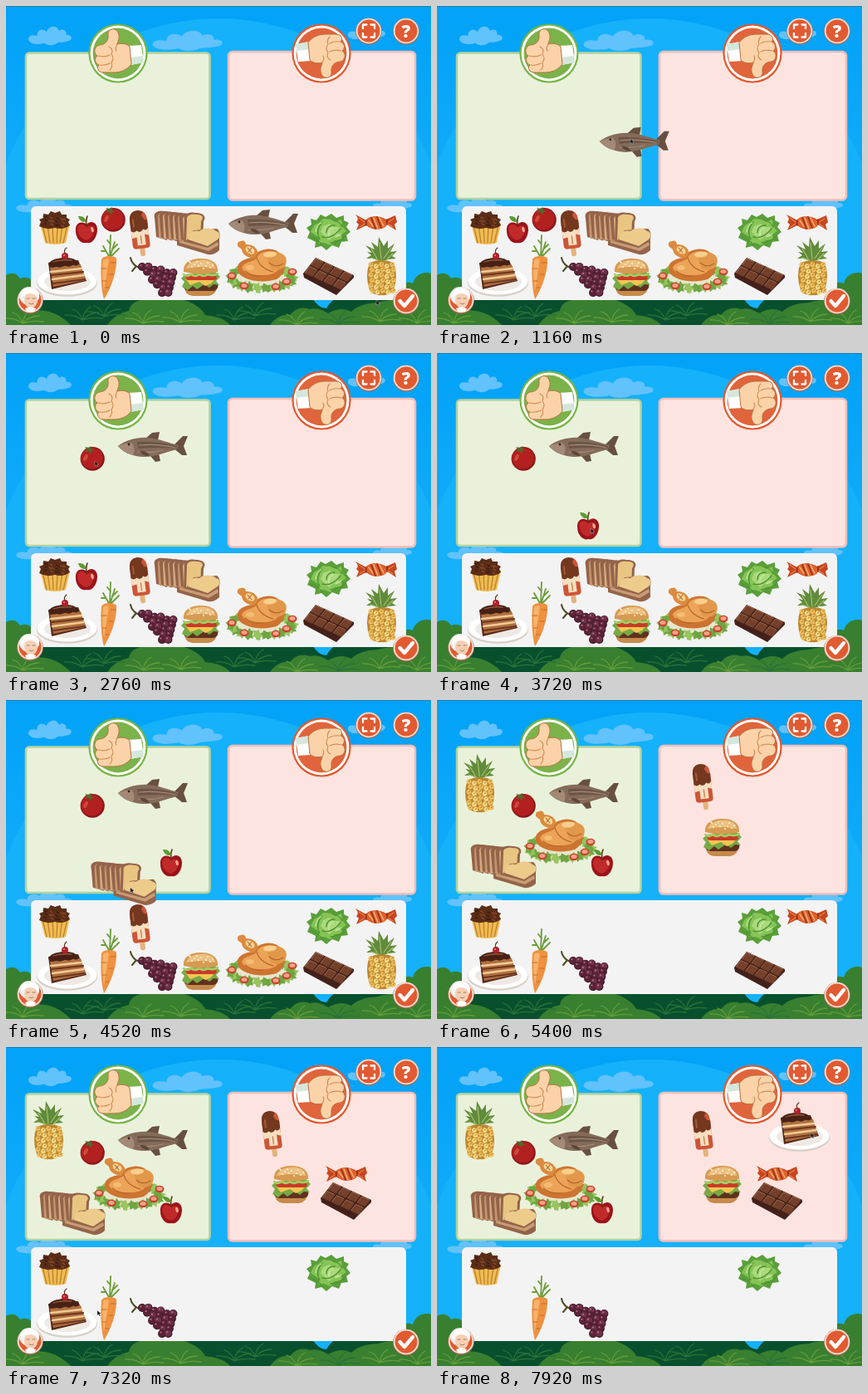
Animation, 512 px wide and 384 px high, one loop 8000 ms. Source, as an HTML page:

```html
<!DOCTYPE html>
<html lang="en">
<head>
<meta charset="utf-8">
<title>Food sorting game</title>
<style>
html, body { margin: 0; height: 100%; overflow: hidden; background: #03a1f5; }
svg { display: block; width: 100vw; height: 100vh; }
</style>
</head>
<body>
<svg id="stage" viewBox="0 0 512 384"></svg>
<script>
const LOOP = 8000, CUT = 5200, CURSOR_BACK = 5480;
const range = (n, make) => Array.from({ length: n }, (_, i) => make(i)).join('');
const path = (fill, d, extra = '') => `<path fill="${fill}" d="${d}" ${extra}/>`;
const line = (color, width, d) =>
  path('none', d, `stroke="${color}" stroke-width="${width}" stroke-linecap="round" stroke-linejoin="round"`);
const oval = (fill, x, y, rx, ry = rx, turn = 0) =>
  `<ellipse fill="${fill}" cx="${x}" cy="${y}" rx="${rx}" ry="${ry}" transform="rotate(${turn} ${x} ${y})"/>`;
const box = (fill, x, y, w, h, r, extra = '') =>
  `<rect fill="${fill}" x="${x}" y="${y}" width="${w}" height="${h}" rx="${r}" ${extra}/>`;
const group = (inner, transform = '') => `<g transform="${transform}">${inner}</g>`;

const cloud = (x, y, w, h) => group(
  path('#62c2fb', 'M1 14C1 9 7 9 12 10C12 3 20 2 24 6C27-1 38-1 40 5C45 2 50 5 49 9C57 8 58 14 52 15C45 17 42 16 38 17C31 21 24 19 21 17C14 19 4 19 1 14Z'),
  `translate(${x} ${y}) scale(${w / 56} ${h / 20})`);

const fern = (color, x, y) => group(
  line(color, 1.3, 'M0 0Q2-12 10-16M0 0Q-3-10-12-13M0 0Q8-9 20-9M0 0Q-10-7-21-6M0 0Q10-4 25-2'),
  `translate(${x} ${y})`);

const hand =
  path('#fff', 'M147 48L163 47 166 68 150 71Z') + path('#d5e7dc', 'M149 62L165 60 166 68 150 71Z') +
  path('#fcd3a8', 'M112 47C119 47 124 42 123 35C122 27 132 25 135 32C138 39 134 43 134 46C141 44 146 46 149 49L151 70C146 77 138 80 130 80H118C110 80 109 74 112 71C107 69 106 63 110 60C105 57 106 49 112 47Z',
    'stroke="#b87142" stroke-width="1"') +
  line('#d08e5b', 1.2, 'M111 60q8 2 14-1M113 71q7 1 12-2M124 49q6 3 3 9q4 5 0 10q2 5-2 9M134 46q-3 5-1 8');

const badge = (x, color, inner, turn) =>
  oval(color, x, 57, 35.6) + oval('#fff', x, 57, 33.4) + oval(inner, x, 57, 30.4) +
  group(hand, `rotate(${turn} ${x} 57) translate(${x - 135} 0)`);

const button = (x, y, icon) =>
  oval('#a9654c', x, y + .6, 15.8) + oval('#f3dccf', x, y, 15.3) + oval('#e15a31', x, y, 13.4) + icon;

const scenery =
  `<defs><linearGradient id="sky" x2="0" y2="1"><stop stop-color="#01a2f8"/><stop offset="1" stop-color="#20b2fb"/></linearGradient></defs>` +
  box('url(#sky)', 0, 0, 512, 384, 0) + oval('#15b1fb', 256, 290, 275) + box('#247fa8', 0, 0, 512, 1, 0) +
  cloud(26, 24, 53, 24) + cloud(175, 29, 86, 26) + cloud(411, 20, 46, 22) +
  cloud(11, 230, 69, 20) + cloud(441, 229, 48, 18) +
  path('#397f30', 'M0 324C8 319 14 323 17 328C27 324 34 331 35 340V384H0ZM476 384V341C476 333 484 331 490 334C493 323 504 319 512 322V384Z') +
  path('#08502d', 'M40 384V350H368Q376 364 386 364Q394 350 406 350H480V384Z') +
  path('#397f30', 'M0 384V358Q20 360 34 367Q58 364 78 384ZM122 384Q132 370 148 367Q150 354 170 353H212Q234 360 240 372Q262 374 270 384ZM318 384Q328 370 342 372Q352 360 366 365Q376 362 388 370Q404 361 416 368Q426 358 448 357Q470 350 512 357V384Z') +
  [[20, 382], [165, 382], [210, 381], [350, 384], [450, 380], [495, 382]].map(p => fern('#629c39', ...p)).join('') +
  [[92, 378], [118, 374], [275, 378], [300, 373], [400, 383]].map(p => fern('#287139', ...p)).join('') +
  box('#eaf1db', 24, 56.5, 221.5, 175.5, 4, 'stroke="#b4d39f" stroke-width="2.6"') +
  box('#fee4e0', 268, 55, 225, 178.5, 5, 'stroke="#f2bdb9" stroke-width="2.6"') +
  box('#f3f3f3', 30, 241, 452, 113, 6) +
  badge(135, '#75b543', '#7cb24a', 0) + badge(380, '#e2582e', '#e0643c', 180) +
  button(437, 30, line('#fff', 2.3, 'M430 27v-4.5h4.5M439.5 22.5h4.5v4.5M444 33v4.5h-4.5M434.5 37.5h-4.5v-4.5')) +
  button(482, 30, '<text x="482" y="37.5" text-anchor="middle" fill="#fff" font-size="21" font-weight="800" font-family="\'Open Sans\', sans-serif">?</text>') +
  button(482, 355, line('#fff', 4.4, 'M474.5 355l5.5 6 10-12')) +
  button(29, 354,
    oval('#f2f0ee', 28, 349, 12, 11) + oval('#f7cfb2', 30, 354, 8, 10) +
    path('#fff', 'M18 352C17 342 25 337 33 340C39 342 41 347 39 353Q36 346 29 346Q22 346 18 352ZM23 364L29 362 36 364 34 368H25Z') +
    line('#8f776a', .9, 'M25 352h3m4 0h3M28 358q3 2 5 0'));

const cupcake =
  path('#f0bc52', 'M41 262L77 262 72 285Q59 289 47 285Z') +
  range(6, i => line('#bd8230', 1.3, `M${44 + i * 6} 264L${49 + i * 4} 285`)) +
  path('#5b2d17', 'M40 265L42 260 40 257 45 255 45 250 51 251 54 247 59 249 65 247 67 251 73 251 73 255 77 257 75 260 77 264Q69 270 59 267Q48 270 40 265Z') +
  range(16, i => line(i % 2 ? '#8a4d2a' : '#3c1c10', 1.3, `M${45 + i * 7 % 27} ${253 + i * 5 % 12}l2.5 1.6`));

const carrot =
  line('#6c9c39', 1.8, 'M125 303L117 289M125 303L126 276M125 303L131 284M125 303L136 292M120 295l-5 0M126 287l-4-5M128 293l6-6') +
  path('#ee9140', 'M115 305C117 300 131 300 133 304C134 322 124 344 118 353C114 340 114 318 115 305Z') +
  path('#f7b36c', 'M117 306Q120 303 124 305Q121 324 118 343Q115 323 117 306Z') +
  line('#c66a28', 1, 'M126 309h6M115 316h6M124 323h5M116 331h5M120 339h4');

// Rows of berries shrink towards the tip of the bunch.
const grapes =
  line('#4c4a24', 2, 'M150 303C152 312 160 317 168 315M157 313l-5 6') +
  range(5, row => range(6 - row, col => {
    const x = 164 + row * 6 + col * 7.5, y = 314 + row * 7.8 + col * 1.8 - (row + col) % 2 * 2;
    return oval('#3c1828', x, y, 4.9) + oval(col % 2 ? '#70304a' : '#5c2238', x - .4, y - .4, 4.1) + oval('#ad7285', x - 1.5, y - 1.7, 1.1);
  }));

const cabbage =
  path('#5a9f3a', 'M363 279L366 272 362 267 368 263 367 256 374 258 379 251 385 254 392 250 398 255 407 252 407 258 413 261 410 266 415 272 410 276 412 283 404 284 401 291 393 288 386 294 380 289 372 291 373 284Z') +
  path('#86c455', 'M367 272L371 264 378 260 382 256 391 257 397 260 404 257 405 265 410 271 404 275 405 281 396 282 391 288 383 285 377 286 377 279Z') +
  path('#abd97b', 'M379 272L382 265 390 262 395 266 402 266 400 273 403 277 394 278 389 282 385 278Z') +
  line('#4d9335', 1.3, 'M378 281Q372 270 381 260M381 278Q393 281 403 268M386 273Q386 264 396 264M367 278Q378 282 381 288M391 285Q402 284 409 277M393 257Q403 260 405 266') +
  line('#d8efb6', 1, 'M389 277Q388 269 394 267M373 272Q374 263 380 261M397 278l7-4');

const fish =
  path('#67503f', 'M301 253L309 246 318 245 316 255ZM335 261L346 250 352 250 347 262 351 273 345 273 335 265ZM306 273L313 281 319 280 317 271Z') +
  path('#846b5a', 'M268 262C276 255 292 251 304 252C318 253 331 259 341 261L339 266C326 269 312 276 297 275C284 274 273 269 268 262Z') +
  path('#a48a76', 'M268 262Q274 259 284 258Q290 264 286 273Q274 269 268 262Z') +
  path('#6c5546', 'M291 257Q316 256 339 262L338 265Q315 263 292 265Z') +
  line('#a48a76', 1.2, 'M293 261Q316 259 337 264M292 269Q308 271 322 267') +
  path('#5d4638', 'M294 268Q303 267 306 274Q298 274 294 268Z') + oval('#2f2521', 281, 260, 1.4);

const tomato =
  oval('#8a171a', 129.2, 257.4, 14.6, 14.3) + oval('#b2201f', 128.5, 256.6, 13.3, 12.8) +
  oval('#cd4a3b', 121, 256, 2.2, 4.5, 25) +
  path('#52692a', 'M125 248l-5 1 3-3-3-3 5 1 3-2 0 4 4 2-4 0-1 4z');

const apple =
  path('#9c131a', 'M97 263C103 257 110 261 110 269C110 278 104 287 97 285C90 287 84 279 84 271C83 261 91 258 97 263Z') +
  path('#c02a2a', 'M86 270C86 261 93 262 97 266Q104 262 107 268Q104 280 97 282Q88 280 86 270Z') +
  oval('#f0aa8e', 104, 269, 1.6, 3.2, -15) +
  line('#5c3318', 1.6, 'M97 265Q96 258 98 253') + path('#5a9a32', 'M97 260Q89 261 87 253Q95 252 97 260Z');

const iceCream = group(
  box('#e3b37c', 159, 286, 6, 15.5, 3) +
  path('#cc5537', 'M151 258Q151 246 161 246Q172 246 172 258V288Q172 292 167 292H156Q151 292 151 288Z') +
  path('#f6dfc0', 'M151 268H172V277L167 275V288H157V278L151 279Z') +
  path('#74381f', 'M151 258Q151 246 161 246Q166 246 168 249Q164 252 167 255Q168 259 172 258V268Q169 272 166 269Q162 274 158 270Q154 273 151 270Z') +
  line('#a45f3a', 1.8, 'M155 256v9') + line('#c98253', 1.4, 'M162 277v9'),
  'rotate(-7 162 274)');

const bread =
  range(6, i => group(
    path('#946349', 'M0 8C-2 1 5-1 11 0C18 0 21 4 17 9L15 35L2 31Z') +
    path(i % 2 ? '#d3aa80' : '#c4966f', 'M4 8C3 3 8 2 11 2C18 2 19 6 14 10L13 34 5 32Z'),
    `translate(${179 + i * 6} ${247 + i * .6})`)) +
  path('#94644a', 'M215 257C213 250 222 247 229 249C237 249 242 253 238 259L237 284 214 286Z') +
  path('#e9c582', 'M218 257C217 252 223 250 229 251C236 251 239 254 235 259L234 281 217 283Z') +
  path('#94644a', 'M206 281L216 284 226 270 254 268Q259 272 257 280V294Q251 300 243 299L206 288Z') +
  path('#c89c74', 'M209 282L243 291 255 284 256 288 244 295 209 285Z') +
  path('#edcb8b', 'M219 281C221 272 226 269 233 271C240 266 249 267 253 271C259 272 258 279 255 281L243 289Z');

const chicken =
  oval('#e6e6cd', 308, 327, 38, 15) +
  range(22, i => {
    const a = i * Math.PI / 11, x = 308 + 37 * Math.cos(a), y = 327 + 13 * Math.sin(a);
    return path(i % 2 ? '#6fa641' : '#98c460', 'M-7 0L-4-4-1-3 2-6 4-2 8-1 5 2 5 5 0 4-4 6-4 2Z', `transform="translate(${x} ${y}) rotate(${i * 40})"`);
  }) +
  range(5, i => group(oval('#c7422f', 0, 0, 5.5, 4.2) + oval('#f2a284', 0, -.4, 3.6, 2.5),
    `translate(${[272, 287, 325, 338, 345][i]} ${[325, 337, 338, 332, 320][i]})`)) +
  path('#cd7430', 'M280 321C275 309 287 304 297 303C305 290 326 289 332 301C340 310 336 323 326 329C309 334 287 331 280 321Z') +
  path('#eca458', 'M284 315C288 306 301 309 303 301C310 293 324 294 329 302C335 311 328 321 319 323C303 326 288 325 284 315Z') +
  path('#db8b3f', 'M299 304Q285 302 284 293L279 289Q278 283 283 283Q288 281 289 287Q300 286 304 297Z') +
  path('#e2984b', 'M314 302Q321 292 332 298Q341 302 336 314Q327 321 319 316Z') +
  oval('#f8d596', 294, 294, 6, 4, 35) + oval('#f8cf8c', 318, 299, 8, 3.5, -5) + oval('#f4bd76', 294, 315, 5, 3) +
  line('#b4652a', 1.1, 'M302 303Q306 316 322 320M288 319Q296 326 310 325M317 309q8 7 17 1M291 291l5 6M296 291l-4 5');

const burger =
  path('#c68a4a', 'M215 338H254Q254 347 244 349H225Q215 348 215 338Z') +
  path('#5f3220', 'M214 334H255Q257 341 250 343H220Q212 341 214 334Z') +
  path('#79a944', 'M212 338L215 332 211 328 216 323 252 320 258 326 253 331 257 336 250 335 245 339 239 335 230 341 225 337 219 342Z') +
  path('#f3c653', 'M216 328H252L247 334 240 337 233 332 222 336Z') +
  path('#c93a28', 'M217 325H253Q256 330 249 330H221Q215 330 217 325Z') +
  line('#a9cc67', 2.4, 'M214 323q5 4 9 0q5 4 10 0q5 4 10 0q6 3 12-1') +
  path('#d79a52', 'M214 320C213 309 222 304 235 304C248 304 256 310 255 320Q235 325 214 320Z') +
  path('#edc184', 'M217 316C220 307 232 305 240 306C249 307 252 312 252 316Q235 312 217 316Z') +
  range(12, i => oval('#fff0cd', 221 + i * 11 % 30, 308 + i * 5 % 9, 1.2, .8, 30));

const pineapple =
  path('#618b3c', 'M451 308L442 304 434 304 440 300 435 296 441 297 433 288 444 293 440 284 448 290 449 278 455 289 460 282 460 292 468 286 463 296 471 295 465 301 470 304 461 305Z') +
  line('#a9c56c', 1.1, 'M452 305L450 285M455 304L464 291M447 304L440 292M449 306l-10-3M459 305l7-7') +
  path('#bc8632', 'M438 309Q453 303 467 309Q473 325 467 342Q461 349 453 348Q443 349 438 342Q432 324 438 309Z') +
  range(6, i => range(5, j => {
    const x = 440 + j * 6.4 + (i % 2 ? .8 : -.8), y = 311 + i * 6.3 + j % 2 * 2;
    return path(j % 2 ? '#f6d980' : '#eebf5c', `M${x - 3} ${y}l2-3 4 1 0 4-4 1.5z`) + line('#8a662b', .8, `M${x} ${y}l1.5-1`);
  }));

const candy =
  path('#c8461f', 'M434 258L421 251Q426 257 422 260L425 263 422 270 434 264Q446 274 459 263L470 270 468 263 471 260 469 252 458 257Q445 249 434 258Z') +
  oval('#e0612d', 446, 261, 13, 7.5, 8) +
  line('#f2b172', 1.5, 'M437 258l5 7M443 255l5 13M450 255l5 10') +
  line('#8f2c16', 1.5, 'M440 255l5 13M447 254l5 13M434 258v6M459 257v6') +
  line('#ee9a5c', 1, 'M425 255l7 5M426 266l6-4M467 256l-6 4M466 266l-6-4');

const corner = (u, v) => `${373 + 46 * u - 15 * v} ${303 + 21 * u + 19 * v}`;
const chocolate =
  path('#43211a', `M${corner(0, 0)}L${corner(1, 0)} 419 327 398 348 359 327 ${corner(0, 1)}Z`) +
  range(8, i => {
    const u = i % 4 / 4 + .02, v = Math.floor(i / 4) / 2 + .03;
    return path('#74402b', `M${corner(u, v)}L${corner(u + .21, v)}L${corner(u + .21, v + .42)}L${corner(u, v + .42)}Z`) +
      line('#a0694a', 1, `M${corner(u, v + .38)}L${corner(u, v)}L${corner(u + .18, v)}`);
  });

const cake =
  oval('#d8cfc6', 73.5, 333, 36.7, 16.8) + oval('#fff', 73.5, 331.5, 36, 16) + oval('#efe9e4', 74, 332, 28, 11) +
  path('#57291a', 'M51 309L87 306 97 331 55 341Z') +
  path('#b0703f', 'M53 315L90 311 96 330 57 338Z') +
  line('#f1cb95', 2.4, 'M54 320L91 316M56 329L94 324') +
  line('#6c3520', 2.2, 'M55 324L93 320M57 334L95 329') +
  path('#482116', 'M51 311Q54 304 70 303Q82 302 88 309Q86 315 81 311Q76 316 71 312Q65 317 60 313Q55 317 51 311Z') +
  line('#91583b', 1.3, 'M57 308Q66 305 79 306') +
  oval('#b3202a', 71, 301, 4) + oval('#ee8379', 70, 300, 1.1) + line('#55331f', 1.1, 'M71 298Q69 294 73 291');

// Pointer positions as [ms, x, y]; dragged food follows the pointer.
const pointerKeys = [
  [0, 446, 354], [200, 446, 354], [820, 305, 259], [880, 305, 259], [1160, 233, 160], [1500, 172, 109], [1750, 172, 109],
  [2250, 132, 260], [2350, 132, 260], [2700, 107, 130], [2900, 107, 130], [3250, 100, 272], [3350, 100, 272],
  [3850, 202, 199], [4030, 202, 199], [4240, 226, 278], [4300, 226, 278], [4520, 150, 226], [4740, 88, 205], [CUT, 88, 205],
  [CURSOR_BACK, 400, 220], [5700, 450, 262], [5780, 450, 262], [6150, 414, 154], [6300, 414, 154], [6520, 402, 283],
  [6650, 390, 326], [6700, 390, 326], [7050, 411, 186], [7120, 411, 186], [7360, 87, 327], [7420, 87, 327],
  [7880, 450, 103], [LOOP, 450, 103]
];

const still = [cupcake, carrot, grapes, cabbage];
const jumps = [
  { art: iceCream, dx: 159, dy: -169 }, { art: pineapple, dx: -401, dy: -213 },
  { art: chicken, dx: -160, dy: -149 }, { art: burger, dx: 109, dy: -161 }
];
const drags = [
  { art: fish, from: 880, to: 1500 }, { art: tomato, from: 2350, to: 2700 }, { art: apple, from: 3350, to: 3850 },
  { art: bread, from: 4300, to: 4740 }, { art: candy, from: 5780, to: 6150 }, { art: chocolate, from: 6700, to: 7050 },
  { art: cake, from: 7420, to: 7880 }
];

const stage = document.getElementById('stage');
stage.innerHTML = scenery + still.join('');
const add = art => {
  const node = document.createElementNS(stage.namespaceURI, 'g');
  node.innerHTML = art;
  return stage.appendChild(node);
};
for (const item of [...jumps, ...drags]) item.node = add(item.art);
const cursor = add(path('#181818', 'M0 0L0 6 1.6 4.8 2.8 7 3.8 6.4 2.8 4.3 4.8 4Z', 'stroke="#fff" stroke-width=".3"'));
const place = (node, x, y) => node.setAttribute('transform', `translate(${x} ${y})`);

const slope = (i, axis) => {
  const a = pointerKeys[i], b = pointerKeys[i + 1];
  return a && b ? (b[axis] - a[axis]) / (b[0] - a[0]) : 0;
};
const tangent = (i, axis) => {
  const before = slope(i - 1, axis), after = slope(i, axis);
  return before * after > 0 ? 2 * before * after / (before + after) : 0;
};
// Monotone cubic: smooth through passing points, at rest on repeated ones.
function pointer(time) {
  let i = 0;
  while (i < pointerKeys.length - 2 && time >= pointerKeys[i + 1][0]) i++;
  const a = pointerKeys[i], b = pointerKeys[i + 1], span = b[0] - a[0], u = (time - a[0]) / span;
  return [1, 2].map(axis => {
    const blend = u * u * (3 - 2 * u);
    return a[axis] + (b[axis] - a[axis]) * blend +
      span * u * (1 - u) * (tangent(i, axis) * (1 - u) - tangent(i + 1, axis) * u);
  });
}

function draw(time) {
  for (const { node, dx, dy } of jumps) place(node, time < CUT ? 0 : dx, time < CUT ? 0 : dy);
  for (const { node, from, to } of drags) {
    const [x0, y0] = pointer(from), [x, y] = pointer(Math.min(Math.max(time, from), to));
    place(node, x - x0, y - y0);
  }
  place(cursor, ...pointer(time));
  cursor.setAttribute('visibility', time >= CUT && time < CURSOR_BACK ? 'hidden' : 'visible');
}

const start = performance.now();
function tick() {
  draw((performance.now() - start) % LOOP);
  requestAnimationFrame(tick);
}
tick();
</script>
</body>
</html>
```
